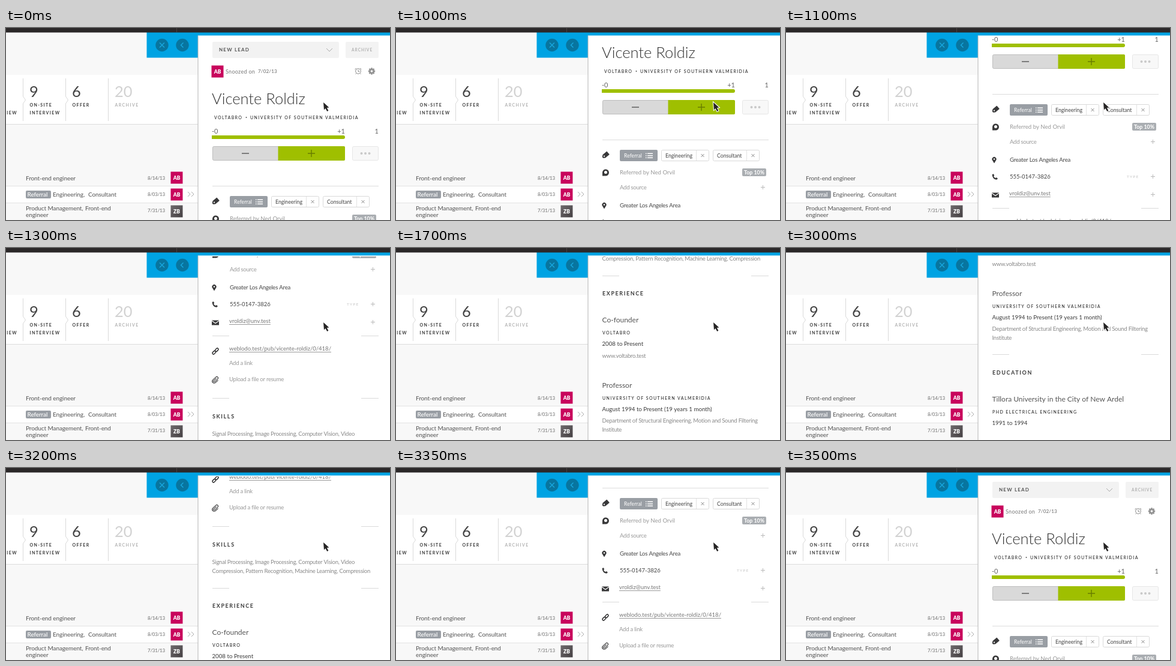
These frames come from a looping animation (640 by 320 pixels, 5.5 s). An HTML page with a canvas:

```html
<!DOCTYPE html>
<html lang="en">
<head>
<meta charset="utf-8">
<title>Lead profile</title>
<style>
  html, body { margin: 0; width: 100%; height: 100%; overflow: hidden; background: #f8f8f8; }
  canvas { display: block; width: 640px; height: 320px; }
</style>
</head>
<body>
<canvas id="stage" width="640" height="320"></canvas>
<script>
const ctx = document.getElementById('stage').getContext('2d');
const LOOP = 5500, STEPS = 11, DEPTH = 844;
const FAMILY = 'Lato, "Open Sans", sans-serif';
const PINK = '#c8045c', GREEN = '#9fbf00', BLUE = '#00a3e3', DARK = '#383839', SLATE = '#999ea4';

// weight, size, letter spacing, colour
const S = {
  count: [400, 25.5, 0, '#444'],
  stage: [700, 7, 1.4, '#3a3a3a'],
  row: [500, 10, -0.1, '#616161'],
  date: [400, 8, -0.2, '#6c6c6c'],
  badge: [900, 8.5, 0, '#fff'],
  caps: [500, 7, 1.4, '#2c2c2c'],
  head: [700, 9, 1.6, '#3c3c3c'],
  title: [400, 12, 0, '#555'],
  body: [400, 9.5, -0.18, '#444'],
  years: [400, 9.7, 0, '#3a3a3a'],
  muted: [400, 9.5, -0.24, '#999'],
  link: [400, 9.5, 0, '#777'],
  chip: [400, 8.7, 0, '#444'],
  score: [400, 11, 0, '#666']
};

// y is the middle of the capitals
function text(str, x, y, style, color, align = 'left') {
  const [weight, size, gap, ink] = style;
  ctx.font = `${weight} ${size}px ${FAMILY}`;
  ctx.letterSpacing = gap + 'px';
  ctx.textAlign = align;
  ctx.fillStyle = color || ink;
  ctx.fillText(str, x, Math.round(y + size * 0.36));
}

function rect(x, y, w, h, color) {
  ctx.fillStyle = color;
  ctx.fillRect(x, y, w, h);
}

function round(x, y, w, h, r, fill, edge) {
  ctx.beginPath();
  ctx.roundRect(x, y, w, h, r);
  if (fill) { ctx.fillStyle = fill; ctx.fill(); }
  if (edge) { ctx.strokeStyle = edge; ctx.lineWidth = 1; ctx.stroke(); }
}

function disc(x, y, r, color) {
  ctx.beginPath();
  ctx.arc(x, y, r, 0, Math.PI * 2);
  ctx.fillStyle = color;
  ctx.fill();
}

function stroke(d, x, y, color, width = 1) {
  ctx.save();
  ctx.translate(x, y);
  ctx.strokeStyle = color;
  ctx.lineWidth = width;
  ctx.stroke(new Path2D(d));
  ctx.restore();
}

function shape(d, x, y, color, turn = 0) {
  ctx.save();
  ctx.translate(x, y);
  ctx.rotate(turn);
  ctx.fillStyle = color;
  ctx.fill(new Path2D(d), 'evenodd');
  ctx.restore();
}

const cross = (x, y, r, color, w) => stroke(`M${-r} ${-r}L${r} ${r}M${r} ${-r}L${-r} ${r}`, x, y, color, w);
const plus = (x, y, r, color, w) => stroke(`M${-r} 0H${r}M0 ${-r}V${r}`, x, y, color, w);

function badge(label, x, y, fill = PINK) {
  rect(x - 0.5, y - 0.5, 20, 20, fill);
  text(label, x + 9.5, y + 9.5, S.badge, null, 'center');
}

function drawPipeline() {
  rect(0, 78, 320, 82, '#fff');
  rect(0, 160, 320, 1, '#dcdcdc');
  for (const x of [28.5, 99.5]) stroke('M0 84V114L4 120L0 126V155', x, 0, '#dadada');
  rect(170, 84, 1, 71, '#dadada');
  text('INTERVIEW', -32, 141, S.stage);
  text('9', 39, 106, S.count);
  text('ON-SITE', 39.5, 128, S.stage);
  text('INTERVIEW', 39.5, 141, S.stage);
  text('6', 110, 106, S.count);
  text('OFFER', 110.5, 128, S.stage);
  text('20', 181, 106, S.count, '#d2d2d2');
  text('ARCHIVE', 181.5, 128, S.stage, '#b4b4b4');
}

function drawRows() {
  rect(0, 264, 320, 27, '#fff');
  for (const y of [263, 291]) rect(0, y, 320, 1, '#e2e2e2');
  text('Front-end engineer', 33, 250, S.row);
  round(33, 271, 42, 13, 2, SLATE);
  text('Referral', 35.5, 277.5, S.row, '#fff');
  text('Engineering,', 78, 277.5, S.row);
  text('Consultant', 137, 277.5, S.row);
  text('Product Management,', 33, 300, S.row);
  text('Front-end', 132, 300, S.row);
  text('engineer', 33, 311, S.row);
  ['8/14/13', '8/03/13', '7/31/13'].forEach((d, i) => text(d, 265, [250, 277, 304][i], S.date, null, 'right'));
  badge('AB', 275, 240);
  badge('AB', 275, 268);
  const g = ctx.createLinearGradient(275, 296, 294, 315);
  g.addColorStop(0, '#6e696c');
  g.addColorStop(1, '#454143');
  badge('ZB', 275, 296, g);
  stroke('M0 -4L4 0L0 4M6 -4L10 0L6 4', 303, 277, '#aaa');
}

function drawChrome() {
  rect(0, 0, 640, 320, '#f8f8f8');
  drawPipeline();
  drawRows();
  rect(234.5, 7, 405.5, 42.5, BLUE);
  rect(0, 0, 640, 7.5, '#2b2829');
  rect(284, 0, 1, 7, '#454142');
  disc(260, 28.5, 10.7, '#08759f');
  disc(294, 28.5, 10.7, '#08759f');
  cross(260, 28.5, 4, '#18a8e0', 1.4);
  stroke('M2 -4L-2 0L2 4', 293.5, 28.5, '#18a8e0', 1.4);
  rect(320, 12.5, 320, 307.5, '#fff');
  rect(319.5, 12.5, 1, 307.5, '#b4b4b4');
}

function drawHeader() {
  round(344, 23, 211, 27, 2, '#f2f2f2');
  text('NEW LEAD', 355, 36.5, [700, 8, 1.2, '#555']);
  stroke('M-5 -2.5L0 2.5L5 -2.5', 539, 36.5, '#aaa');
  round(566, 23, 55, 27, 2, '#f3f3f3');
  text('ARCHIVE', 576, 36.5, [700, 6.5, 1, '#b2b2b2']);

  badge('AB', 343, 63);
  text('Snoozed on', 366, 72.5, [400, 9, 0.3, '#777']);
  text('7/02/13', 420, 72.5, [400, 8, 0.2, '#666']);
  stroke('M4.3 0A4.3 4.3 0 1 1 -4.3 0A4.3 4.3 0 1 1 4.3 0M0 -2.5V.5H2.2M-5.5 -3L-3 -5M5.5 -3L3 -5M-3 3.5L-4.5 5M3 3.5L4.5 5', 587, 72, '#8a8a8a');
  for (let i = 0; i < 8; i++) shape('M-1.3 -5.7H1.3V-3H-1.3Z', 609.5, 72, '#929292', i * Math.PI / 4);
  disc(609.5, 72, 4.3, '#929292');
  disc(609.5, 72, 1.8, '#fff');

  text('Vicente Roldiz', 343, 118, [300, 25.5, 0, '#333']);
  text('VOLTABRO', 347, 149, S.caps);
  disc(400.5, 149, 1, '#555');
  text('UNIVERSITY OF SOUTHERN VALMERIDIA', 407, 149, S.caps);
}

function drawScore() {
  text('-0', 343, 172, S.score);
  text('+1', 565, 172, S.score, null, 'right');
  text('1', 621, 172, S.score, null, 'right');
  round(343, 179, 222, 6, [0, 3, 3, 0], GREEN);
  round(344.5, 197.5, 220, 23, 2, '#d9d9d9', '#bdbdbd');
  round(453.5, 197, 111.5, 24, [0, 2, 2, 0], GREEN);
  stroke('M-6 0H6', 399, 209, '#555', 1.4);
  plus(509, 209, 6, '#687d00', 1.4);
  round(577.5, 197.5, 43, 23, 2, '#f8f8f8', '#e6e6e6');
  for (const x of [592.5, 599, 605.5]) disc(x, 209, 2, '#c9c9c9');
  rect(344, 263, 277, 1, '#dcdcdc');
}

function chip(label, x, w) {
  round(x + 0.5, 280.5, w - 1, 18, 2, '#fff', '#d9d9d9');
  text(label, x + 7, 289.5, S.chip);
  rect(x + w - 22, 281, 1, 17, '#e2e2e2');
  cross(x + w - 11, 289.5, 2.5, '#888');
}

function drawTags() {
  shape('M-6 -1L-3 -3.5H6V3.5H-3L-6 1ZM-3.6 -1V1H-1.6V-1Z', 349, 289, DARK, -0.7);
  round(373, 280, 63, 19, 2, SLATE);
  text('Referral', 380, 289.5, S.chip, '#fff');
  for (const y of [285.5, 289, 292.5]) {
    rect(416, y, 1.5, 1.5, '#fff');
    rect(419, y, 9, 1.5, '#fff');
  }
  chip('Engineering', 442, 80);
  chip('Consultant', 528, 78);
}

function drawContact() {
  shape('M-5 6V0A5.5 5.5 0 1 1 .5 6ZM3 0A2.5 2.5 0 1 0 -2 0A2.5 2.5 0 1 0 3 0Z', 349, 317.5, DARK);
  text('Referred by Ned Orvil', 373, 317.5, [400, 9.6, 0, '#999']);
  round(577, 311, 40, 13, 2, '#aaaeb2');
  text('Top 10%', 597, 317.5, [700, 8.8, 0, '#fff'], null, 'center');
  text('Add source', 373, 343, S.muted);

  shape('M0 5.5L-3 .6A3.6 3.6 0 1 1 3 .6ZM1.3 -1.5A1.3 1.3 0 1 0 -1.3 -1.5A1.3 1.3 0 1 0 1.3 -1.5Z', 347, 373, DARK);
  text('Greater Los Angeles Area', 373, 373, S.body);

  shape('M-4.5 -3.5L-2.5 -5L-.7 -2.2L-2 -1Q-.8 1.2 1.2 2.2L2.4 .9L5 2.8L3.4 4.8Q-3.6 4.4 -4.5 -3.5Z', 348, 401, DARK);
  text('555-0147-3826', 373, 400.5, S.link, '#444');
  text('TYPE', 568, 400.5, [400, 6.5, 1.2, '#c4c4c4']);

  shape('M-6 -4H6V4H-6Z', 349, 431.5, DARK);
  stroke('M-6 -3.2L0 1L6 -3.2', 349, 431.5, '#fff', 1.1);
  underlined('vroldiz@unv.test', 429);
  for (const y of [342.5, 400.5, 430.5]) plus(611.5, y, 3.5, '#bbb');

  dashes(453);
  for (const [x, y] of [[-2.2, 2.2], [2.2, -2.2]]) {
    ctx.save();
    ctx.translate(349 + x, 479 + y);
    ctx.rotate(-Math.PI / 4);
    round(-3.2, -1.8, 6.4, 3.6, 1.8);
    ctx.strokeStyle = DARK;
    ctx.lineWidth = 1.6;
    ctx.stroke();
    ctx.restore();
  }
  underlined('weblodo.test/pub/vicente-roldiz/0/418/', 475);
  text('Add a link', 372, 499, S.muted);
  ctx.save();
  ctx.translate(349, 527);
  ctx.rotate(0.8);
  stroke('M-1 -3V3A1.2 1.2 0 0 0 1.4 3V-4A2.2 2.2 0 0 0 -3 -4V3A3.1 3.1 0 0 0 3.3 3V-3', 0, 0, DARK, 1.1);
  ctx.restore();
  text('Upload a file or resume', 372, 526, S.muted);
  dashes(557);
}

function underlined(str, y) {
  text(str, 372, y, S.link);
  rect(372, y + 5, ctx.measureText(str).width, 1, '#999');
}

function dashes(y) {
  rect(344, y, 28, 1, '#dadada');
  rect(592, y, 29, 1, '#dadada');
}

function entry(y, title, place, years) {
  text(title, 343.5, y, S.title);
  text(place, 344, y + 21.5, S.caps);
  text(years, 343.5, y + 39.5, S.years);
}

function drawHistory() {
  text('SKILLS', 344, 588, S.head);
  text('Signal Processing, Image Processing, Computer Vision, Video', 343.5, 617, S.muted, '#888');
  text('Compression, Pattern Recognition, Machine Learning, Compression', 343.5, 632, S.muted, '#888');
  dashes(660);

  text('EXPERIENCE', 344, 690, S.head);
  entry(734, 'Co-founder', 'VOLTABRO', '2008 to Present');
  text('www.voltabro.test', 343.5, 794, S.muted, '#888');
  entry(843, 'Professor', 'UNIVERSITY OF SOUTHERN VALMERIDIA', 'August 1994 to Present (19 years 1 month)');
  text('Department of Structural Engineering, Motion and Sound Filtering', 343.5, 902, S.muted, '#888');
  text('Institute', 343.5, 917, S.muted, '#888');
  dashes(944);

  text('EDUCATION', 344, 975, S.head);
  entry(1019, 'Tillora University in the City of New Ardel', 'PHD ELECTRICAL ENGINEERING', '1991 to 1994');
  entry(1106, 'Universidad Politécnica de Belvar', 'TELECOMMUNICATIONS ENGINEERING', '1983 to 1989');
}

function drawPanel(scroll) {
  ctx.save();
  ctx.beginPath();
  ctx.rect(321, 14, 319, 306);
  ctx.clip();
  ctx.translate(0, -scroll);
  drawHeader();
  drawScore();
  drawTags();
  drawContact();
  drawHistory();
  ctx.restore();
}

function drawCursor() {
  const d = 'M0 0L1 12.5L3.4 10L6.2 15L8.4 13.8L5.8 9L9.4 8.4Z';
  stroke(d, 529, 124, '#fff', 2);
  shape(d, 529, 124, '#262424');
}

// The page scrolls in equal notches: slowly down, then twice as fast back up.
function scrollAt(t) {
  const notches = (start, every) => Math.max(0, Math.min(STEPS, Math.floor((t - start) / every) + 1));
  return Math.round((notches(1000, 100) - notches(3000, 50)) * DEPTH / STEPS);
}

const began = performance.now();
function frame() {
  const t = (performance.now() - began) % LOOP;
  drawChrome();
  drawPanel(scrollAt(t));
  drawCursor();
  requestAnimationFrame(frame);
}
frame();
</script>
</body>
</html>
```
